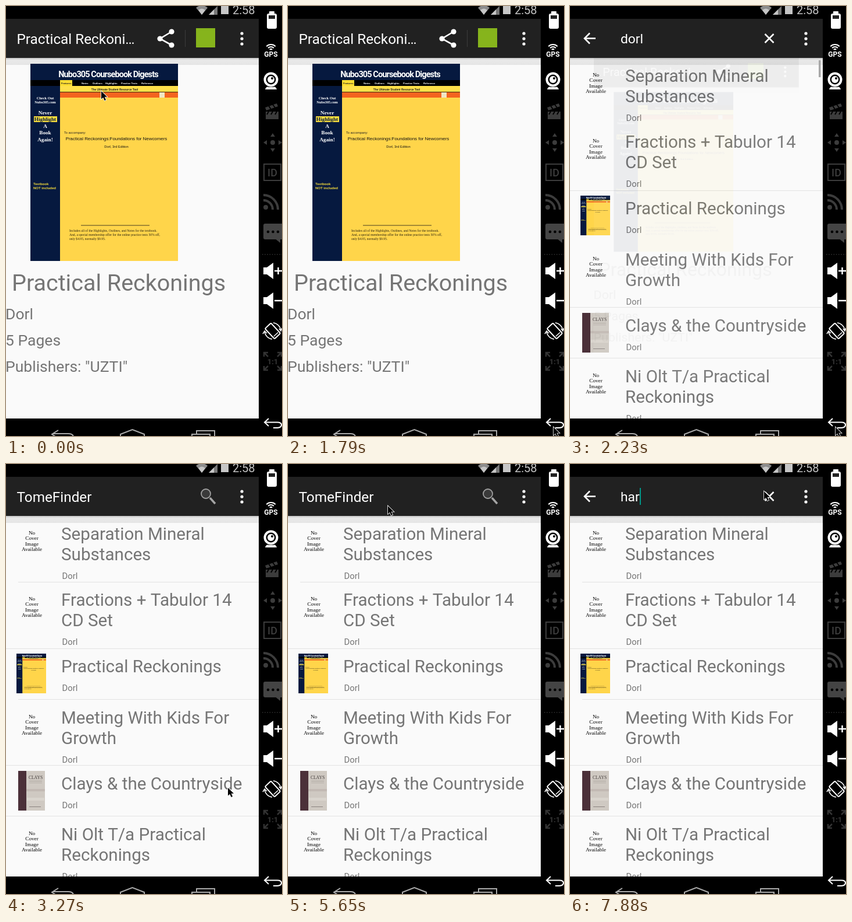
These frames come from a looping animation (475x737 px, 8 s). An HTML page with a canvas:

```html
<!DOCTYPE html>
<html lang="en">
<head>
<meta charset="utf-8">
<title>Book search</title>
<style>
html, body { margin: 0; width: 100%; height: 100%; overflow: hidden; background: #000; }
canvas { display: block; }
</style>
</head>
<body>
<canvas id="stage" width="475" height="737"></canvas>
<script>
const LOOP = 8000, W = 435, TOP = 22, BOTTOM = 707;
const SANS = 'Roboto, sans-serif', ARIAL = '"Liberation Sans", sans-serif', SERIF = '"Liberation Serif", serif';
const AUTHOR = 'Dorl', BOOK = 'Practical Reckonings';
const NAVY = '#06193f', YELLOW = '#ffd54a', BAR = '#212121', GREY = '#757575', DIM = '#3c3c3c';

const screen = document.getElementById('stage').getContext('2d');
const layer = document.createElement('canvas');
layer.width = 475;
layer.height = 737;
const layerCtx = layer.getContext('2d');
let c = screen;

// ---- drawing helpers ----
function rect(x, y, w, h, color) {
  c.fillStyle = color;
  c.fillRect(x, y, w, h);
}
function round(x, y, w, h, r, color) {
  c.fillStyle = color;
  c.beginPath();
  c.roundRect(x, y, w, h, r);
  c.fill();
}
function text(s, x, y, size, color, { family = SANS, weight = 400, align = 'left', spacing = 0 } = {}) {
  c.font = `${weight} ${size}px ${family}`;
  c.textAlign = align;
  c.letterSpacing = spacing + 'px';
  c.fillStyle = color;
  c.fillText(s, x, y);
}
function dot(x, y, r, color) {
  c.fillStyle = color;
  c.beginPath();
  c.arc(x, y, r, 0, 7);
  c.fill();
}
function stroke(d, color, width = 2, x = 0, y = 0) {
  c.save();
  c.translate(x, y);
  c.strokeStyle = color;
  c.lineWidth = width;
  c.stroke(new Path2D(d));
  c.restore();
}
function fill(d, color, x = 0, y = 0) {
  c.save();
  c.translate(x, y);
  c.fillStyle = color;
  c.fill(new Path2D(d));
  c.restore();
}

// ---- emulator frame ----
function statusBar() {
  rect(0, 0, 475, TOP, '#000');
  fill('M327 3Q337 -5 347 3L337 15Z', '#8c8c8c');
  fill('M331 7Q337 2 343 7L337 15Z', '#c6c6c6');
  fill('M364 0V15H349Z', '#777');
  fill('M358 6V15H349Z', '#c6c6c6');
  rect(370, 0, 13, 14, '#c6c6c6');
  text('2:58', 390, 14, 20, '#c4c4c4');
}

function navBar() {
  rect(0, BOTTOM, W, 30, '#000');
  stroke('M90 727L79 734L90 741M80 733H107Q115 733 116 738', '#aaa', 2);
  stroke('M197 740V734L217.5 726L238 734V740', '#aaa', 2);
  stroke('M328 733V728H359V740M320 740V734H351V740', '#aaa', 2);
}

function speaker(y, sign) {
  fill('M443 -6H449L460 -14V14L449 6H443Z', '#fff', 0, y);
  stroke(sign, '#fff', 2.5, 0, y);
}

function sidebar() {
  rect(W, 0, 40, 737, '#000');
  round(453, 9, 9, 6, 1, '#fff');
  round(449, 13, 17, 26, 3, '#fff');
  rect(452, 16, 11, 6, '#222');

  for (const r of [3, 7, 11]) {
    c.beginPath();
    c.arc(456, 77, r, -2.35, -0.79);
    c.strokeStyle = '#fff';
    c.lineWidth = 2;
    c.stroke();
  }
  text('GPS', 456, 87, 12, '#fff', { weight: 700, align: 'center' });

  dot(456, 126, 12.5, '#fff');
  dot(456, 126, 8.5, '#000');
  dot(456, 126, 6, '#fff');
  dot(458, 124, 2, '#000');
  fill('M446 143Q448 137 452 139H460Q464 137 466 143Z', '#fff');

  fill('M446 174L466 167L468 172L448 179Z', DIM);
  rect(447, 181, 22, 13, DIM);
  stroke('M452 171L456 177M459 169L463 174M452 181L449 186M459 181L456 186M466 181L463 186', '#000', 2);

  for (let i = 0; i < 4; i++) {
    c.save();
    c.translate(459, 234);
    c.rotate(i * Math.PI / 2);
    fill('M-4 -10H4L0 -16Z', DIM);
    c.restore();
  }
  dot(459, 234, 4, DIM);

  stroke('M444 271H473V299H444Z', DIM, 2);
  text('ID', 458.5, 292, 18, DIM, { weight: 500, align: 'center' });

  dot(447, 345, 4, DIM);
  stroke('M443 333A16 16 0 0 1 459 349M443 324A25 25 0 0 1 468 349', DIM, 4);

  round(443, 373, 36, 27, 3, '#444');
  fill('M462 398H472V406Z', '#444');
  for (const x of [451, 459.5, 468]) dot(x, 387, 2.3, '#000');

  for (let x = 441; x < 475; x += 4.2) rect(x, 425, 1.5, 1.5, '#333');

  speaker(454, 'M462 0H475M468.5 -6V6');
  speaker(505, 'M462 0H475');

  c.save();
  c.translate(459, 557);
  c.rotate(-0.75);
  c.strokeStyle = '#fff';
  c.lineWidth = 2;
  c.beginPath();
  c.roundRect(-7, -12, 14, 24, 2);
  c.stroke();
  stroke('M-5 8H5', '#fff', 1.5);
  c.restore();
  stroke('M460 543A15 15 0 0 1 473 556M470 553L473 557L475 552M458 571A15 15 0 0 1 445 558M442 562L445 557L449 561', '#fff', 1.5);

  stroke('M444 601V594H451M444 594L451 601M467 594H474V601M474 594L467 601M444 617V624H451M444 624L451 617M467 624H474V617M474 624L467 617', '#333', 2.5);
  text('1:1', 459, 614, 13, '#333', { weight: 700, align: 'center' });

  stroke('M452 707L445 713.5L452 720M445 713.5H467Q474 713.5 474 718T467 723H460', '#fff', 2);
}

// ---- toolbar parts ----
function toolbarBase() {
  rect(0, TOP, W, BOTTOM - TOP, '#fafafa');
  const shade = c.createLinearGradient(0, 89, 0, 101);
  shade.addColorStop(0, '#c4c4c4');
  shade.addColorStop(0.3, '#e9e9e9');
  shade.addColorStop(1, '#e5e5e5');
  rect(0, 89, W, 12, shade);
  rect(0, TOP, W, 67, BAR);
  for (const y of [47, 56, 65]) dot(406, y, 2.6, '#fff');
}
function title(s) {
  text(s, 18.5, 65, 24.3, '#fff');
}
function titleBar() {
  title('TomeFinder');
  stroke('M351 58L360 68', '#a5a5a5', 3.5);
  dot(344, 51, 8, '#3a3a3a');
  stroke('M336 51A8 8 0 1 1 352 51A8 8 0 1 1 336 51', '#a0a0a0', 1.8);
}
function queryBar(query, caret) {
  const size = 22.8;
  stroke('M34 46.5L25 55.5L34 64.5M25 55.5H44', '#fff', 2.6);
  text(query, 87, 64, size, '#fff');
  if (query) stroke('M335.5 48L350.5 63M350.5 48L335.5 63', '#fff', 2.6);
  if (caret) {
    c.font = `400 ${size}px ${SANS}`;
    rect(Math.round(87 + c.measureText(query).width), 41, 2, 29, '#009688');
  }
}

// ---- book covers ----
function cover() {
  rect(42, 99, 254, 338, NAVY);
  rect(93, 137, 203, 300, YELLOW);
  text('Nubo305 Coursebook Digests', 176, 122, 14.5, '#fff', { weight: 700, align: 'center', spacing: -0.9 });
  rect(42, 127, 254, 10, '#000');
  rect(93, 127, 21, 10, '#ffdd33');
  const tab = { family: ARIAL, weight: 700 };
  text('Features', 95, 134, 4.2, '#222', tab);
  [['Notes', 130], ['Outlines', 149], ['Highlights', 171], ['Practice Tests', 198], ['Reference', 233]]
    .forEach(([s, x]) => text(s, x, 134, 4.2, '#fff', tab));
  rect(93, 137, 203, 10, '#ffe04a');
  text('The Ultimate Student Resource Tool', 187, 144.5, 4.7, '#222', { ...tab, align: 'center' });
  rect(93, 147, 203, 1, '#3a2a10');
  rect(93, 148, 203, 9, '#f4641f');
  rect(264, 148, 9, 9, '#f1e6c4');

  const side = { family: SERIF, weight: 700, align: 'center' };
  text('Check Out', 67.5, 160, 6.4, '#fff', side);
  text('Nubo305.com', 67.5, 167, 6.2, '#fff', side);
  rect(48, 189, 40, 10, '#f6dc3c');
  ['Never', 'Highlight', 'A', 'Book', 'Again!'].forEach((s, i) =>
    text(s, 67.5, 186 + i * 11.4, 9.2, i === 1 ? NAVY : '#fff', side));
  text('Textbook', 47, 307, 6, '#f6dc3c', tab);
  text('NOT included', 47, 314, 6, '#f6dc3c', tab);

  text('To accompany:', 100, 219, 5.6, '#222', { family: ARIAL });
  text(BOOK + ':Foundations for Newcomers', 190, 230, 7.9, '#111', { family: ARIAL, align: 'center' });
  text(AUTHOR + ', 3rd Edition', 190, 243, 5.8, '#111', { family: ARIAL, align: 'center' });
  rect(129, 375.5, 118, 1, '#4a4020');
  ['Includes all of the Highlights, Outlines, and Notes for the textbook.',
   'And, a special membership offer for the online practice tests 50% off,',
   'only $4.95, normally $9.95.'
  ].forEach((s, i) => text(s, 109, 387 + i * 6.8, 5.6, '#2a2410', { family: SERIF }));
}
function thumb() {
  c.save();
  c.translate(18, 325);
  c.scale(51 / 254, 68 / 338);
  c.translate(-42, -99);
  cover();
  c.restore();
}
function clayCover() {
  rect(21, 526, 46, 68, '#cfc9c2');
  rect(21, 526, 14, 68, '#4b3039');
  text('CLAYS', 51, 540, 7.6, '#443d3b', { family: SERIF, align: 'center' });
  rect(40, 543, 22, 1, '#aaa39c');
  rect(40, 546, 22, 1, '#b5aea8');
  rect(35, 557, 32, 4, '#c2b9b3');
  rect(36, 572, 30, 5, '#d9d4cd');
  rect(40, 587, 20, 1, '#8b8380');
}
function noCover(y) {
  ['No', 'Cover', 'Image', 'Available'].forEach((s, i) =>
    text(s, 44.5, y + i * 9.3, 9.2, '#000', { family: SERIF, align: 'center' }));
}

// ---- pages ----
function detailPage() {
  toolbarBase();
  title('Practical Reckoni…');
  stroke('M285 44L265 56L285 67', '#fff', 2.6);
  dot(265, 56, 4.6, '#fff');
  dot(285, 44, 4.6, '#fff');
  dot(285, 67, 4.6, '#fff');
  rect(308, 41, 1, 29, '#3b3b3b');
  rect(327, 38, 33, 33, '#86b41c');
  cover();
  text(BOOK, 10, 488, 39.5, GREY);
  text(AUTHOR, -1, 537, 26.5, GREY);
  text('5 Pages', -1, 582, 26.5, GREY);
  text('Publishers: "UZTI"', -1, 627, 26.5, GREY);
}

const ROWS = [
  [130, 'Separation Mineral', 'Substances'],
  [243, 'Fractions + Tabulor 14', 'CD Set'],
  [357, BOOK, '', thumb],
  [445, 'Meeting With Kids For', 'Growth'],
  [558, 'Clays & the Countryside', '', clayCover],
  [645, 'Ni Olt T/a Practical', 'Reckonings']
];

function listPage(t) {
  toolbarBase();
  c.save();
  c.beginPath();
  c.rect(0, 89, W, BOTTOM - 89);
  c.clip();
  for (const [y, first, second, art] of ROWS) {
    text(first, 95, y, 29.6, GREY);
    text(second, 95, y + 34.5, 29.6, GREY);
    text(AUTHOR, 96.5, y + (second ? 67 : 32), 14.8, GREY);
    art ? art() : noCover(y - 9);
  }
  for (const y of [316, 516, 603]) rect(0, y, W, 1, '#e2e2e2');
  if (t >= 2680) for (const y of [202, 403]) rect(21, y, W - 21, 1, '#e2e2e2');
  c.restore();
  if (t < 2680) rect(428, 93, 3.5, 29, '#a8a8a8');

  if (t < 2680) queryBar(AUTHOR.toLowerCase(), false);
  else if (t < 2830) {
    c.globalAlpha = 0.5;
    queryBar('', false);
    titleBar();
    c.globalAlpha = 1;
  }
  else if (t < 6680) titleBar();
  else if (t < 7580) queryBar('', t < 7280);
  else queryBar(t < 7880 ? 'ha' : 'har', true);
}

// The closing page shrinks about its centre while fading.
function closingPage(scale, alpha) {
  c = layerCtx;
  c.clearRect(0, 0, 475, 737);
  detailPage();
  c = screen;
  c.save();
  c.beginPath();
  c.rect(0, TOP, W, BOTTOM - TOP);
  c.clip();
  c.globalAlpha = alpha;
  c.translate(217.5, 354);
  c.scale(scale, scale);
  c.drawImage(layer, 0, TOP, W, BOTTOM - TOP, -217.5, TOP - 354, W, BOTTOM - TOP);
  c.restore();
}

// ---- pointer: each move is sampled in equal steps along its path ----
const MOVES = [
  { start: 150, end: 1190, steps: 8, path: [[164, 146], [178, 400], [229, 716], [168, 700]] },
  { start: 1340, end: 1790, steps: 4, path: [[168, 700], [310, 668], [457, 722]] },
  { start: 3120, end: 4160, steps: 8, path: [[457, 722], [158, 52]] },
  { start: 4310, end: 4450, steps: 2, path: [[158, 52], [133, 55]] },
  { start: 5650, end: 6390, steps: 6, path: [[133, 55], [210, 88], [290, 62], [334, 47]] }
];

function along(path, u) {
  const p = u * (path.length - 1);
  const i = Math.min(Math.floor(p), path.length - 2);
  const [a, b] = [path[i], path[i + 1]];
  return a.map((v, k) => v + (b[k] - v) * (p - i));
}
function pointerAt(t) {
  const move = MOVES.filter(m => t >= m.start).pop();
  if (!move) return MOVES[0].path[0];
  const { start, end, steps, path } = move;
  const step = 1 + Math.floor((t - start + 4) / (end - start) * (steps - 1));
  return along(path, Math.min(1, step / steps));
}
function pointer(t) {
  const [x, y] = pointerAt(t).map(Math.round);
  const arrow = 'M0 0V13.5L3.2 10.7L5.6 16L8 15L5.6 9.8H10Z';
  stroke(arrow, '#fff', 1.6, x, y);
  fill(arrow, '#000', x, y);
}

function draw(t) {
  rect(0, 0, 475, 737, '#000');
  if (t < 2080) detailPage();
  else listPage(t);
  if (t >= 2080 && t < 2230) closingPage(0.94, 0.7);
  if (t >= 2230 && t < 2380) closingPage(0.81, 0.06);
  statusBar();
  navBar();
  sidebar();
  pointer(t);
}

const begin = performance.now();
function tick() {
  draw((performance.now() - begin) % LOOP);
  requestAnimationFrame(tick);
}
tick();
</script>
</body>
</html>
```
